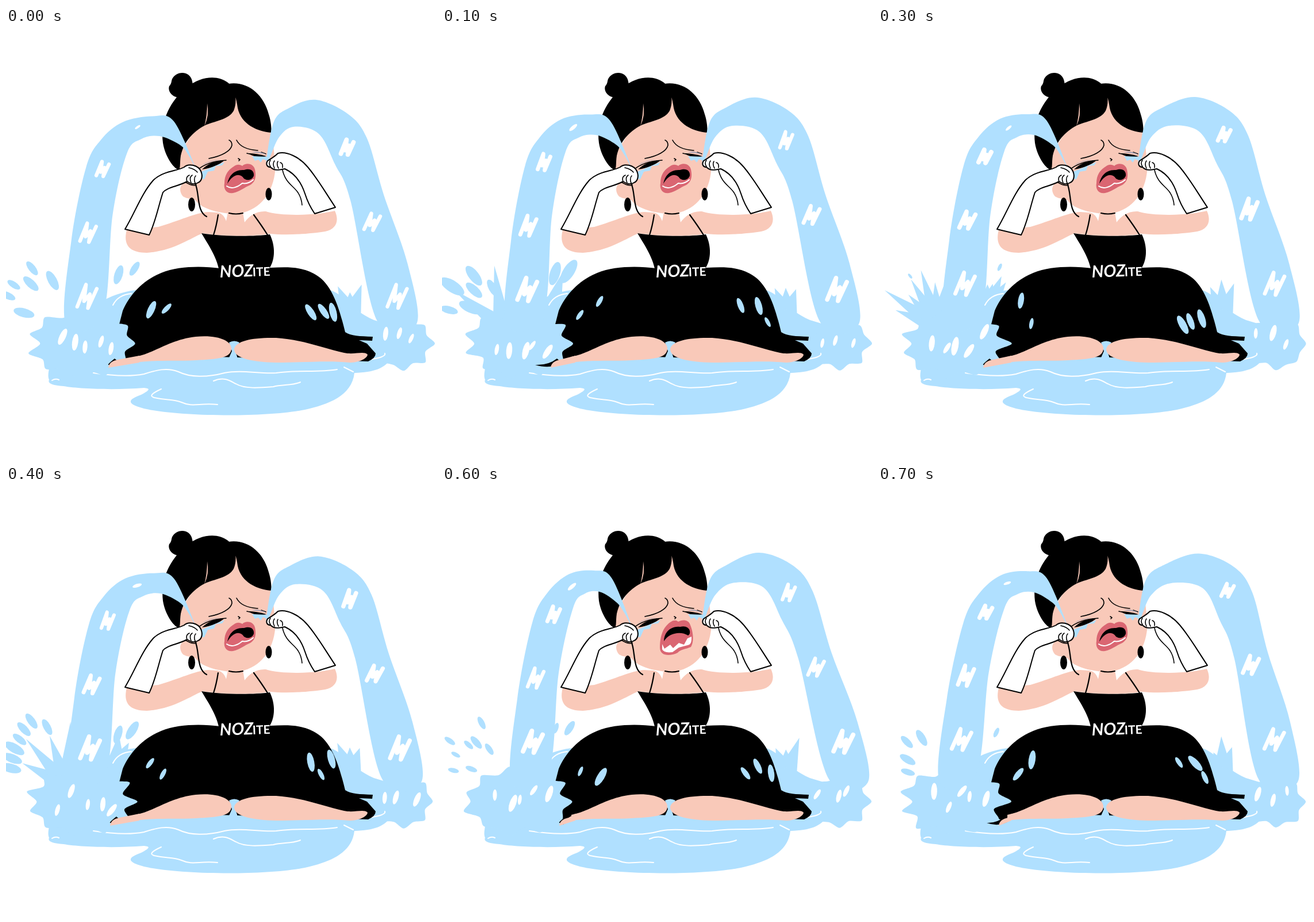
An HTML page that plays this animation: 748x748 px, repeating every 0.8 s.

```html
<!DOCTYPE html>
<html lang="en">
<head>
<meta charset="utf-8">
<title>Flood of tears</title>
<style>
html,body{margin:0;width:100%;height:100%;overflow:hidden;background:#fff}
svg{display:block;width:100vw;height:100vh}
.water{fill:#b0e0ff}
.skin{fill:#f9c9b9}
.lip{fill:#da6672}
.white{fill:#fff}
.ink,.thin,.ripple,.mark{fill:none;stroke-linecap:round;stroke-linejoin:round}
.ink,.thin{stroke:#000;stroke-width:2.2}
.thin{stroke-width:1.6}
.ripple{stroke:#fff;stroke-width:2}
.mark{stroke:#fff}
.glove{fill:#fff;stroke:#000;stroke-width:2;stroke-linejoin:round}
.word{fill:#fff;font-family:Lato,Arial,sans-serif;font-weight:700}
.pose{visibility:hidden;animation:show 800ms step-end infinite}
@keyframes show{0%{visibility:visible}12.5%,100%{visibility:hidden}}
</style>
</head>
<body>
<svg viewBox="0 0 748 748">
  <path class="water" d="M75 612C70 600 80 590 72 570L110 500C150 490 175 462 225 456L560 455C590 462 598 490 640 508L680 520L686 576L670 574C660 592 640 599 606 600C602 640 560 655 520 664C450 678 300 676 240 662C207 653 213 646 235 638C250 630 252 627 240 626C190 630 130 628 100 623C80 622 72 618 75 612Z"/>
  <g id="back"></g>
  <path class="ripple" d="M152 600C185 605 215 607 240 602C262 595 280 590 300 598C320 608 350 608 380 600C410 594 440 602 470 600C510 594 540 600 576 594M361 614C380 606 390 614 400 619C415 628 440 626 465 624C480 620 500 622 512 616M270 628C255 635 248 640 258 643C280 648 290 645 305 651C325 660 335 652 368 655M588 590L604 598M632 577C650 574 661 571 659 566M80 613Q86 609 92 612M186 482Q195 464 218 462"/>

  <!-- dress and legs -->
  <path d="M372 418C340 414 300 414 270 426C235 440 213 468 203 492L185 562L215 582L300 570L630 580Q643 574 643 566L628 549L614 543L637 544L638 537C615 536 600 536 590 529C578 480 565 442 535 427C510 414 485 416 460 417Z"/>
  <path class="water" d="M388 547Q397 542 406 547L399 562L404 578H386L393 562Z"/>
  <path class="skin" d="M225 572C260 565 285 542 330 537C370 533 394 545 392 559C390 574 370 576 330 578C290 580 260 577 225 582ZM397 558C400 544 430 538 470 539C515 542 552 557 588 565C606 569 622 561 629 568C628 576 612 582 598 582C560 578 520 582 470 582C430 581 396 575 397 558Z"/>

  <!-- arms and bodice -->
  <path class="skin" d="M352 320C330 321 300 336 265 346L210 351C204 375 212 391 245 391C290 388 320 366 342 357C380 363 430 363 459 358C490 361 530 358 555 354C575 350 580 335 572 318C540 326 480 328 452 319C435 318 423 327 415 338L412 320H386L383 336C380 326 373 321 366 321Z"/>
  <path d="M340 357C380 363 430 363 459 359C469 380 468 402 459 417L455 430H372C369 400 351 376 340 357Z"/>
  <path class="ink" d="M369 325Q366 345 361 360M431 325Q445 344 455 360"/>
  <g transform="rotate(-2 372 434)">
    <text class="word" x="372" y="434" font-size="29" font-style="italic">NOZ</text>
    <text class="word" x="429" y="434" font-size="21">ITE</text>
  </g>

  <!-- head -->
  <path class="skin" d="M320 190L302 220L301 245L312 268C302 272 300 284 308 293C316 298 324 296 330 300C338 312 365 323 400 323C440 320 464 288 468 250C468 215 463 170 445 140L395 105L345 150Z"/>
  <path d="M296 120C288 118 281 109 284 101C289 96 287 91 290 87C297 76 311 76 318 82C326 89 323 97 327 103L310 130ZM386 95C400 106 403 128 396 144C387 160 361 162 345 170C325 181 310 197 304 222C302 235 304 245 300 247C291 243 277 224 273 200C268 160 287 125 315 103C338 84 368 81 386 95ZM387 97C420 92 448 115 457 150C462 165 462 180 461 182C438 180 409 168 403 139C401 123 397 110 387 97Z"/>
  <path class="skin" d="M350 131Q354 152 345 171Q350 152 350 131Z"/>
  <ellipse cx="323" cy="307" rx="6" ry="12"/><ellipse cx="457" cy="289" rx="5.5" ry="11"/>
  <path class="ink" d="M388 322Q400 325 412 322"/>
  <path class="thin" d="M353 227C375 223 391 214 393 204Q393 197 388 195M401 195Q409 211 438 213M404 227L407 229L405 231M333 247Q350 232 383 230M339 249L330 250M419 218L454 225M444 216L452 219"/>
  <path d="M341 246Q356 231 380 230Q367 242 341 246ZM421 218Q436 218 453 223Q435 227 421 218Z"/>
  <path fill="#a6a2b4" d="M340 239Q355 229 374 229Q355 231 340 239ZM427 216Q440 213 453 220Q440 217 427 216Z"/>
  <path class="water" d="M340 250L380 233L376 239L365 240L362 248L351 250L345 263L336 262ZM428 223L456 224L456 232L447 228L443 234L439 229L433 231Z"/>

  <g id="front"></g>

  <!-- gloves and loose hair -->
  <path class="glove" d="M207 350C225 320 236 287 257 264C275 248 298 249 310 242C317 235 334 238 339 249C343 258 340 267 334 269C327 274 320 270 315 267C298 276 280 277 273 286C265 310 260 338 249 360ZM573 312C555 285 542 262 525 242C510 224 488 214 473 218C467 224 460 228 455 231C451 238 455 242 460 242C467 249 475 247 485 245C503 253 514 270 520 288Q526 307 537 323Z"/>
  <path class="thin" d="M315 267Q312 259 319 256M322 269Q318 260 324 256M329 270Q326 261 330 257M318 243Q328 245 333 251M460 241Q456 235 460 230M467 244Q463 236 467 231M474 244Q470 237 473 232M481 243Q482 235 477 234M312 268Q325 276 331 273"/>
  <path class="ink" d="M329 270C337 287 331 319 349 328"/>
  <path class="thin" d="M481 247C486 269 498 273 507 285Q514 295 515 308"/>
</svg>
<script>
const lerp = (a, b, t) => a + (b - a) * t;
const clamp = t => Math.max(0, Math.min(1, t));
const range = n => [...Array(n).keys()];

// Seeded random: rnd(a, b) lies between a and b
function dice(seed) {
  let s = seed * 7919;
  return (a, b) => {
    s = (s * 16807 + 11) % 2147483647;
    return lerp(a, b, s / 2147483647);
  };
}

const path = (cls, d) => `<path class="${cls}" d="${d}"/>`;
const oval = (cls, x, y, rx, ry, turn) =>
  `<ellipse class="${cls}" rx="${rx}" ry="${ry}" transform="translate(${x} ${y}) rotate(${turn})"/>`;

// Smooth closed outline through points
function blob(p, k = 6) {
  const at = i => p[(i + p.length) % p.length];
  return 'M' + p[0] + p.map((b, i) => {
    const o = at(i - 1), c = at(i + 1), e = at(i + 2);
    return `C${b[0] + (c[0] - o[0]) / k} ${b[1] + (c[1] - o[1]) / k} ${c[0] - (e[0] - b[0]) / k} ${c[1] - (e[1] - b[1]) / k} ${c}`;
  }).join('') + 'Z';
}

// Key points of the two arcs of tears; mid gives the middle line at height y
const arcs = {
  left: {
    eye: 330, mid: y => 147 + 38 * clamp((400 - y) / 180) ** 2,
    at: [[110,515],[120,370],[146,240],[172,190],[210,158],[258,150],[293,161],[330,244],[318,222],[303,203],[270,186],[240,190],[217,215],[192,325],[174,500]]
  },
  right: {
    eye: 455, mid: y => 598 + (y - 185) * .34,
    at: [[453,230],[466,163],[495,138],[548,120],[606,143],[640,187],[670,290],[712,410],[728,515],[660,510],[612,300],[585,235],[555,180],[505,170],[475,190],[457,230]]
  }
};

// sway: sideways shift of an arc at its top and foot
const calm = {seed: 4, left: [-7, -6], right: [-12, -14], lift: 6, fall: 22, drops: 6, size: 17, blades: 0, foot: 179, shoe: 0};
const leaves = {...calm, drops: 11, size: 27, veins: true};
const surge = {seed: 9, left: [-3, 2], right: [-3, -3], lift: 1, fall: 10, drops: 6, size: 22, blades: 2, foot: 190, shoe: 28};
const crest = {seed: 16, left: [2, 5], right: [4, 3], lift: 0, fall: 0, drops: 2, size: 8, blades: 7, foot: 184, shoe: 0};
const burst = {seed: 23, left: [11, 11], right: [4, 13], lift: -5, fall: 0, drops: 8, size: 13, blades: 0, foot: 205, shoe: 0, wail: true};
const swell = {seed: 31, left: [4, -3], right: [12, 2], lift: -3, fall: -4, drops: 4, size: 15, blades: 0, foot: 211, shoe: 22};

// Halfway pose between two others
const half = (a, b) => Object.fromEntries(Object.keys(crest).map(k => [k,
  Array.isArray(a[k]) ? a[k].map((v, i) => (v + b[k][i]) / 2) : Math.round((a[k] + b[k]) / 2)]));

const poses = [calm, surge, half(surge, crest), crest, half(crest, leaves), leaves, burst, swell];

const sway = (p, side, y) => lerp(...p[side], clamp((y - 150) / 360));

function stream(p, side) {
  const {at, eye} = arcs[side];
  return path('water', blob(at.map(([x, y]) => {
    const free = clamp((Math.abs(x - eye) - 20) / 90);
    return [x + free * sway(p, side, y), y + free * p.lift * clamp((300 - y) / 150)];
  })));
}

// White bolts riding down an arc
function bolts(p, side) {
  const rnd = dice(p.seed + side.length);
  return range(3).map(i => {
    const y = (side == 'left' ? 224 : 186) + (side == 'left' ? 111 : 130) * i + p.fall;
    const x = arcs[side].mid(y) + sway(p, side, y);
    const w = 11 + 3 * i, h = rnd(12, 18) + 4 * i;
    const spots = [[-w, h * .7], [-w * .1, -h * .9], [-w * .3, h * .3], [w * .3, -h * .2], [w * .1, h * .8], [w, -h * .6]];
    return `<path class="mark" stroke-width="${rnd(6, 8)}" d="M${spots.map(([u, v]) => [x + u, y + v]).join('L')}"/>`;
  }).join('');
}

// Ragged round pool where an arc lands
function pool(seed, cx, cy, rx, ry, n) {
  const rnd = dice(seed);
  return path('water', blob(range(n).map(i => {
    const a = i / n * 2 * Math.PI, r = i % 2 ? rnd(.8, .92) : rnd(1, 1.12);
    return [cx + rx * r * Math.cos(a), cy + ry * r * Math.sin(a)];
  }), 7));
}

// Pieces thrown out from a point, spread between two angles in degrees
function fan(n, x, y, from, to, piece) {
  return range(n).map(i => {
    const deg = lerp(from, to, (i + .5) / n), a = deg * Math.PI / 180;
    return piece(r => [x + r * Math.cos(a), y + r * Math.sin(a)], deg, a);
  }).join('');
}

function spray(p) {
  const rnd = dice(p.seed + 50);
  const drop = (near, far) => (out, deg) => {
    const [x, y] = out(rnd(near, far)), long = p.size * rnd(.6, 1.1);
    return oval('water', x, y, long, long * .42, deg)
      + (p.veins ? `<path class="ripple" d="M${x - 3} ${y - long / 2}l3 ${long / 2}l5 -4l-2 ${long / 2}"/>` : '');
  };
  const blade = (near, far) => (out, deg, a) => {
    const [x, y] = out(10), w = 15, dx = w * Math.sin(a), dy = w * Math.cos(a);
    return path('water', `M${x + dx} ${y - dy}L${out(rnd(near, far))}L${x - dx} ${y + dy}Z`);
  };
  return fan(p.drops, 125, 520, 190, 246, drop(75, 138))
    + fan(Math.ceil(p.drops / 4), 175, 495, 280, 310, drop(65, 95))
    + fan(p.blades, 105, 520, 195, 285, blade(75, 115))
    + fan(Math.ceil(p.blades / 2), 190, 490, 265, 310, blade(40, 70))
    + fan(3, 600, 500, 235, 300, blade(40, 66));
}

// Drops on the skirt and white flecks on the pools
function flecks(p) {
  const rnd = dice(p.seed + 90);
  const row = (n, cls, x0, x1, y0, y1, size, tilt) => range(n).map(i => {
    const long = size * rnd(.6, 1.2);
    return oval(cls, lerp(x0, x1, (i + rnd(.2, .8)) / n), rnd(y0, y1), long, long * .36, tilt + rnd(-20, 20));
  }).join('');
  return row(2, 'water', 232, 288, 468, 515, 15, 115)
    + row(3, 'water', 515, 580, 475, 525, 15, 65)
    + row(5, 'white', 85, 195, 528, 570, 14, 110)
    + row(3, 'white', 645, 722, 530, 552, 13, 105)
    + row(1, 'white', 218, 238, 168, 175, 8, -30);
}

const mouth = path('lip', 'M380 270C380 254 388 246 396 241C402 236 408 238 411 240C417 234 430 235 433 246C436 260 433 268 425 273C415 277 406 285 395 287C384 289 378 281 380 270Z')
  + path('', 'M385 271C388 254 400 246 414 247C426 243 432 249 431 257C428 265 420 266 414 262C407 251 394 255 385 271Z')
  + path('ripple', 'M384 275C392 281 403 277 411 270Q421 272 430 264');
const wail = path('lip', 'M379 281C379 257 387 244 397 237Q405 231 411 236C418 232 429 232 432 242C438 257 438 272 433 280C424 284 415 284 410 290C398 296 379 297 379 281Z')
  + path('', 'M386 270C386 253 400 243 414 245Q428 242 431 252Q432 258 428 260C416 252 395 255 386 270Z')
  + path('white', 'M383 275L387 283L397 276L402 282L412 273L421 276L427 265L434 262Q435 276 427 277L412 281L401 289Q386 291 383 284Z');

const foot = ({foot: x, shoe}) =>
  path('', `M${x - shoe} 586Q${x - 5} 587 ${x + 10} 575L${x + 18} 582Q${x} 594 ${x - shoe} 586Z`)
  + path('skin', `M232 570L${x + 15} 577Q${x} 580 ${x - 1} 591L232 582Z`);

const layer = (id, draw) => document.getElementById(id).innerHTML = poses.map((p, i) =>
  `<g class="pose" style="animation-delay:${i * 100 - 800}ms">${draw(p)}</g>`).join('');

layer('back', p => spray(p) + pool(p.seed + 7, 692, 549, 50, 44, 16));
layer('front', p => (p.wail ? wail : mouth)
  + pool(p.seed, 132, 549, 90, 56, 22) + foot(p)
  + stream(p, 'left') + stream(p, 'right')
  + flecks(p) + bolts(p, 'left') + bolts(p, 'right'));
</script>
</body>
</html>
```
